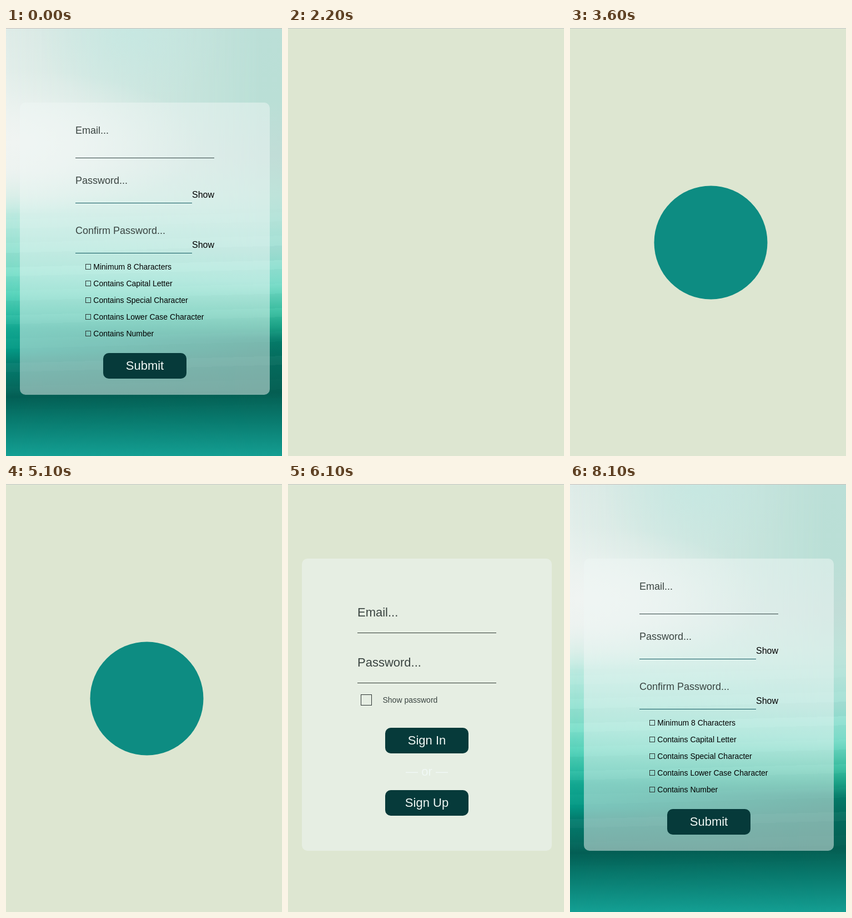
Animation of 497x769 px, one loop 9900 ms. Source, as an HTML page:

```html
<!DOCTYPE html>
<html lang="en">
<head>
<meta charset="utf-8">
<title>Sign up</title>
<style>
  html, body { margin: 0; width: 100%; height: 100%; overflow: hidden; background: #dde6d1; }
  #stage { position: relative; width: 497px; height: 769px; overflow: hidden; }
  #sea, #sea div, svg { position: absolute; inset: 0; }
  #left {
    background: linear-gradient(#dfece8, #e4efeb 100px, #e8f1ee 250px, #d6eee7 300px, #bdebe1 335px,
      #97e4d4 400px, #7de0cc 440px, #5bd6bd 475px, #34c3aa 510px, #14aa93 540px, #069b87 580px,
      #057e70 603px, #076d61 640px, #055f55 662px, #08786c 700px, #14a094 769px);
  }
  #right {
    background: linear-gradient(#bbdfd7, #badfd6 130px, #c1ddd7 230px, #bee3da 300px, #b6e4da 340px,
      #a3e1d6 400px, #80dfcd 455px, #54cdb3 490px, #37bd9f 512px, #1ba286 538px, #067e6b 560px,
      #056b5d 600px, #055f53 655px, #08776b 700px, #149e92 769px);
    -webkit-mask-image: linear-gradient(90deg, transparent, #000 92%);
    mask-image: linear-gradient(90deg, transparent, #000 92%);
  }
  #light {
    background:
      radial-gradient(ellipse 330px 130px at 20px 205px, #f0f4f2, rgba(240,244,242,.7) 35%, rgba(240,244,242,.25) 70%, rgba(240,244,242,0)),
      radial-gradient(ellipse 170px 130px at 225px 10px, rgba(196,232,226,.7), rgba(196,232,226,0));
  }
  #bands {
    background: repeating-linear-gradient(178.5deg, rgba(255,255,255,.035) 0 16px, rgba(0,60,55,.02) 16px 42px,
      rgba(255,255,255,.015) 42px 60px, rgba(0,60,55,.035) 60px 86px);
    -webkit-mask-image: linear-gradient(transparent 320px, #000 400px, #000 600px, transparent 690px);
    mask-image: linear-gradient(transparent 320px, #000 400px, #000 600px, transparent 690px);
  }
  svg { display: block; font-family: "Liberation Sans", Arial, sans-serif; }
</style>
</head>
<body>
<div id="stage">
  <div id="sea">
    <div id="left"></div><div id="right"></div><div id="light"></div><div id="bands"></div>
  </div>
  <svg width="497" height="769" viewBox="0 0 497 769">
    <rect id="panel" x="25" y="134" width="450" height="525" rx="10" fill="#f0f8f5" fill-opacity=".5"/>
    <g id="signUp"></g>
    <g id="signIn"></g>
    <rect id="focus" x="125" y="285" width="210" height="30" rx="2" fill="none" stroke="#101010" stroke-width="2"/>
    <circle id="logo" cx="253.5" cy="385.5" r="102" fill="#0d8c82"/>
    <rect id="edge" width="497" height="1"/>
  </svg>
</div>
<script>
  const LOOP = 9900;
  const FOCUS = 1600, SPLASH = 2200, FADE_OUT = 5050, LOGIN = 6100, FORM = 7000;
  const el = id => document.getElementById(id);

  const text = (x, y, size, str, fill = '#000', anchor = 'start') =>
    `<text x="${x}" y="${y}" font-size="${size}" fill="${fill}" text-anchor="${anchor}">${str}</text>`;
  const label = (y, size, str) => text(125, y, size, str, '#3a4441');
  const line = (y, width, fill) => `<rect x="125" y="${y}" width="${width}" height="1" fill="${fill}"/>`;
  const box = (x, y, w, h) =>
    `<rect x="${x}" y="${y}" width="${w}" height="${h}" fill="none" stroke="#2c3433"/>`;
  const button = (y, str) =>
    `<rect x="175" y="${y}" width="150" height="46" rx="10" fill="#063a3a"/>` +
    text(250, y + 30, 22, str, '#f0f8f5', 'middle');

  const rules = ['Minimum 8 Characters', 'Contains Capital Letter', 'Contains Special Character',
    'Contains Lower Case Character', 'Contains Number'];

  el('signUp').innerHTML =
    label(190, 18, 'Email...') + line(233, 250, '#344646') +
    label(280, 18, 'Password...') + line(314, 210, '#125a62') + text(335, 305, 16, 'Show') +
    label(370, 18, 'Confirm Password...') + line(404, 210, '#125a62') + text(335, 395, 16, 'Show') +
    rules.map((rule, i) => box(143.5, 424.5 + 30 * i, 9, 9) + text(157.3, 434 + 30 * i, 14, rule)).join('') +
    button(584, 'Submit');

  el('signIn').innerHTML =
    label(238, 22, 'Email...') + line(267, 250, '#303a33') +
    label(328, 22, 'Password...') + line(357, 250, '#303a33') +
    box(131.5, 378.5, 19, 19) + text(170.5, 393, 14, 'Show password', '#3a4441') +
    button(438, 'Sign In') +
    text(250, 524, 22, '— or —', '#f0f8f5', 'middle') +
    button(550, 'Sign Up');

  const clamp = v => Math.min(1, Math.max(0, v));

  // Cubic Bezier easing, solved by bisection
  const bezier = (x1, y1, x2, y2) => p => {
    const at = (a, b, s) => 3 * a * s * (1 - s) ** 2 + 3 * b * s * s * (1 - s) + s ** 3;
    let lo = 0, hi = 1;
    for (let i = 0; i < 24; i++) {
      const mid = (lo + hi) / 2;
      if (at(x1, x2, mid) < p) lo = mid; else hi = mid;
    }
    return at(y1, y2, lo);
  };
  const ease = bezier(.25, .1, .25, 1);
  const easeInOut = bezier(.42, 0, .58, 1);

  const show = (id, on) => { el(id).style.display = on ? '' : 'none'; };

  function draw(now) {
    const t = Math.floor(now % LOOP / 100) * 100;
    const splash = t >= SPLASH && t < LOGIN;
    const login = t >= LOGIN && t < FORM;

    show('panel', !splash);
    show('signUp', !splash && !login);
    show('signIn', login);
    show('focus', t >= FOCUS && t < SPLASH);
    show('logo', splash);

    const sea = t < SPLASH ? 1 : clamp((t - LOGIN) / 600);
    el('sea').style.opacity = sea;
    el('edge').setAttribute('fill', sea > .5 ? '#c9bfbb' : '#c5c9c8');
    el('logo').style.opacity = t < FADE_OUT
      ? ease(clamp((t - SPLASH) / 1000))
      : 1 - easeInOut(clamp((t - FADE_OUT) / 1000));
  }

  const start = performance.now();
  function tick() {
    draw(performance.now() - start);
    requestAnimationFrame(tick);
  }
  tick();
</script>
</body>
</html>
```
